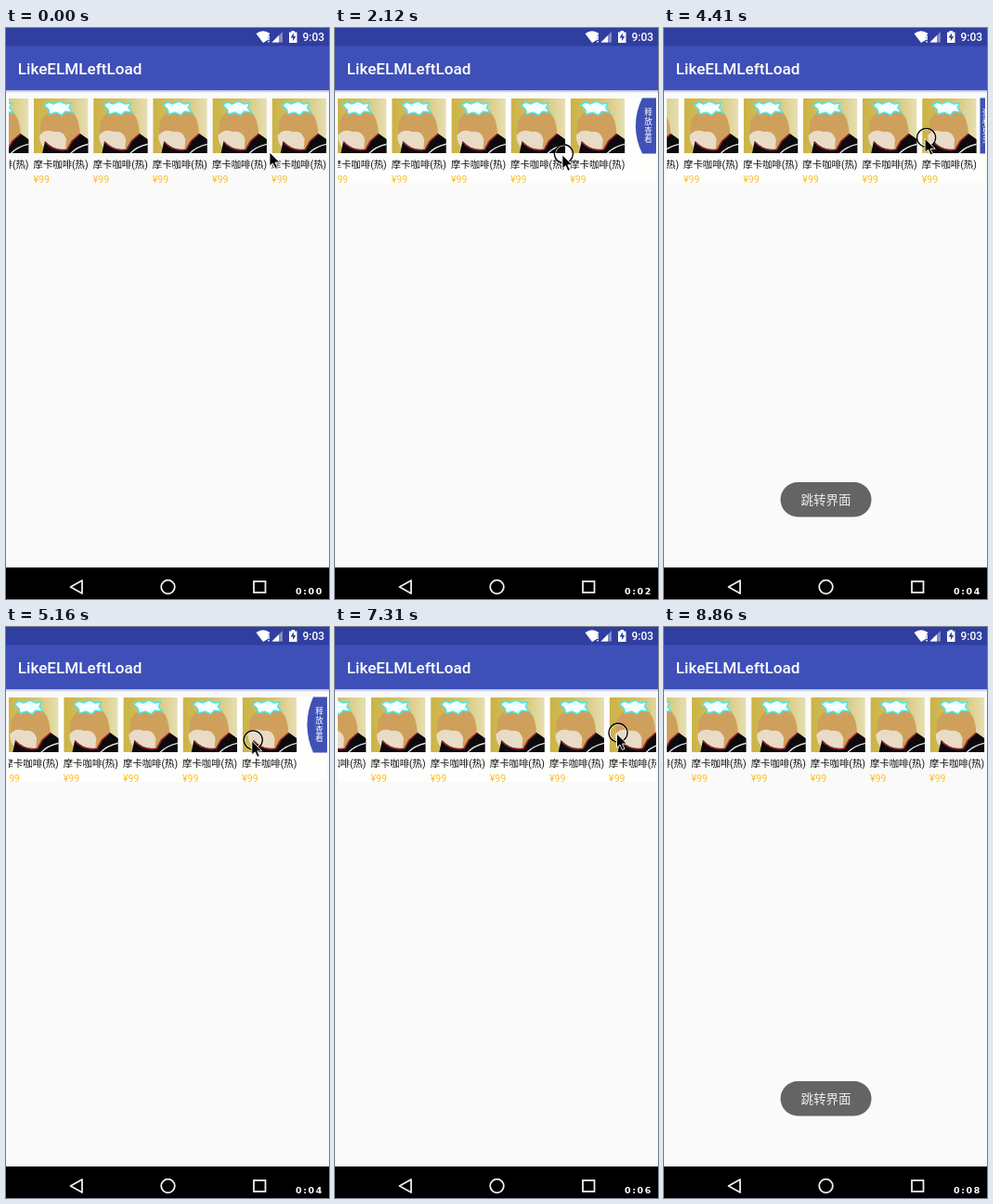
An HTML page that plays this animation: 348 by 616 pixels, repeating every 9.59 s.

```html
<!DOCTYPE html>
<html lang="zh-CN">
<head>
<meta charset="utf-8">
<title>LikeELMLeftLoad</title>
<style>
html, body { margin: 0; width: 100%; height: 100%; overflow: hidden; background: #fafafa; }
svg { display: block; width: 348px; height: 616px; }
text { font-family: Roboto, "Noto Sans CJK SC", "Noto Sans CJK", sans-serif; }
#clock { font: bold 9.5px "DejaVu Sans", sans-serif; letter-spacing: 1.6px; }
</style>
</head>
<body>
<svg viewBox="0 0 348 616">
  <defs>
    <linearGradient id="backdrop">
      <stop offset="0" stop-color="#cbb345"/>
      <stop offset=".55" stop-color="#d5c36c"/>
      <stop offset="1" stop-color="#e6dfb4"/>
    </linearGradient>
    <linearGradient id="shade" x2="0" y2="1">
      <stop offset="0" stop-color="#a9b1dc"/>
      <stop offset="1" stop-color="#fafafa"/>
    </linearGradient>
    <clipPath id="photo"><rect width="58.5" height="59"/></clipPath>
    <clipPath id="listArea"><rect x="3" y="75" width="343" height="92"/></clipPath>
    <g id="card">
      <g transform="translate(0 76)" clip-path="url(#photo)">
        <rect width="58.5" height="59" fill="url(#backdrop)"/>
        <path d="M8 24Q13 12 28 13 44 10 48 26 52 40 46 53H14Q4 42 8 24Z" fill="#cfa05c"/>
        <path d="M6 40Q12 32 22 36 32 34 35 44L34 56H14Q6 50 6 40Z" fill="#e8dcc6"/>
        <path d="M11 7L16 4 21 6 28 3 34 6 40 5 38 10 42 15 34 14 30 18 24 15 17 17 16 12Z" fill="#f4ffff" stroke="#4fe6e6" stroke-width="1.5"/>
        <path d="M9 60L12 46Q22 57 36 55L40 47 50 38 60 45V60Z" fill="#0c0a0c"/>
        <path d="M12 47Q22 58 36 55L41 46 50 38" fill="none" stroke="#96222a" stroke-width="1.6"/>
        <path d="M39 60Q46 52 60 49" fill="none" stroke="#eee" stroke-width="1.3"/>
      </g>
      <text x="-.5" y="151" font-size="10.4" fill="#111">摩卡咖啡(热)</text>
      <text x="-.5" y="166.5" font-size="10.6" fill="#fbc02d">¥99</text>
    </g>
  </defs>

  <rect width="348" height="616" fill="#fafafa"/>
  <rect y="67" width="348" height="3" fill="url(#shade)"/>
  <rect y="19" width="348" height="48" fill="#3e50b7"/>
  <rect width="348" height="19.5" fill="#303ea0"/>
  <text x="12.8" y="50" font-size="17.1" font-weight="500" fill="#fff">LikeELMLeftLoad</text>

  <g fill="#fff">
    <path d="M269.5 6Q277 .5 284.5 6L282 9V13L277 16Z"/>
    <path d="M282.3 8h1.5v5h-1.5zM282.3 14h1.5v1.6h-1.5z"/>
    <path d="M298 4V15.5H286.5Z" opacity=".4"/>
    <path d="M294 8V15.5H286.5Z"/>
    <path d="M305 4.5H307.5V3H311V4.5H313.5V16H305Z"/>
    <text x="319.5" y="14" font-size="12" font-weight="500">9:03</text>
  </g>
  <path d="M310 5.5L306.5 10.5H309V14L312.3 9H310Z" fill="#303ea0"/>

  <g clip-path="url(#listArea)">
    <rect id="band" x="3" y="75" width="343" height="92" fill="#fefefd"/>
    <g id="cards"></g>
    <path id="tail" fill="#3f51b5"/>
    <g id="tailText" font-size="8.6" fill="#fff" text-anchor="middle"></g>
  </g>

  <g id="toast">
    <rect x="125.5" y="490" width="98" height="37.5" rx="18.7" fill="#646464"/>
    <text x="174.5" y="514" font-size="13.5" fill="#eee" text-anchor="middle">跳转界面</text>
  </g>

  <rect y="582" width="348" height="34"/>
  <g fill="none" stroke="#eee" stroke-width="1.8">
    <path d="M69.5 603L82 596V610Z" stroke-linejoin="round"/>
    <circle cx="174.5" cy="603" r="7.3"/>
    <rect x="267" y="597" width="12.5" height="12"/>
  </g>
  <text id="clock" x="312" y="611" fill="#fff"></text>

  <g id="pointer">
    <g id="press" fill="none">
      <circle cx="1.5" r="9" stroke="#fff"/>
      <circle cx="1.5" r="10" stroke="#000" stroke-width="1.3"/>
    </g>
    <path d="M0 1V16L3.5 13 6 18.5 8.5 17.5 6 12H11Z" stroke="#fff" stroke-width=".9"/>
  </g>
</svg>
<script>
const LOOP = 9590, STEP = 150, PHASE = 10;
const PITCH = 64.15, REST = 286.6, RIGHT = 346;
const $ = id => document.getElementById(id);

const ramp = (t, from, to) => Math.min(1, Math.max(0, (t - from) / (to - from)));
const linear = u => u;
const easeOut = u => 1 - (1 - u) ** 2;

// Each gesture adds to the list's pull and the pointer's position.
const gestures = [
  { from: 800, to: 2710, pull: 48, x: -57, y: 4, ease: linear },
  { from: 2710, to: 3270, pull: -48, x: -10, y: 0, ease: easeOut },
  { from: 3270, to: 3710, pull: 0, x: 70, y: -20, ease: linear },
  { from: 4090, to: 5560, pull: 46, x: -32, y: 7, ease: linear },
  { from: 6240, to: 7210, pull: -55, x: 48.5, y: -10, ease: linear },
  { from: 7400, to: 8160, pull: 51, x: -47, y: 4, ease: linear },
  { from: 8160, to: 8760, pull: -42, x: 106, y: 8, ease: easeOut },
];

const travel = (t, axis) => gestures.reduce(
  (sum, g) => sum + g[axis] * g.ease(ramp(t, g.from, g.to)), 0);

const isPressed = t => (t >= 300 && t <= 2710) || (t >= 3710 && t <= 8160);

const toastOpacity = (t, shown) =>
  ramp(t, shown, shown + 200) * (1 - ramp(t, shown + 2050, shown + 2300));

$('cards').innerHTML = Array.from({ length: 7 }, (_, i) =>
  `<use href="#card" x="${(i - 6) * PITCH}"/>`).join('');
$('tailText').innerHTML = Array.from({ length: 4 }, (_, i) =>
  `<text y="${94 + 9.8 * i}"></text>`).join('');
const tailChars = [...$('tailText').children];

function drawTail(pull) {
  const width = Math.min(15, pull * .65);
  const left = RIGHT - width;
  const bulge = 11 * ramp(pull, 20, 40);
  const control = left - 2 * bulge;
  $('tail').setAttribute('d', pull > 0
    ? `M${RIGHT} 75.5H${left}Q${control} 105.5 ${left} 135.5H${RIGHT}Z` : '');
  $('tailText').setAttribute('transform', `translate(${left + 6.5})`);
  $('tailText').style.display = pull > 0 ? '' : 'none';
  const label = pull > 28 ? '释放查看' : '查看更多';
  tailChars.forEach((node, i) => node.textContent = label[i]);
}

function draw(time) {
  const t = Math.max(0, Math.floor((time - PHASE) / STEP) * STEP + PHASE);
  const pull = travel(t, 'pull');
  $('cards').setAttribute('transform', `translate(${REST - pull})`);
  $('band').style.display = Math.abs(pull) > .01 ? '' : 'none';
  drawTail(pull);
  $('toast').style.opacity = Math.max(toastOpacity(t, 2710), toastOpacity(t, 8310));
  $('clock').textContent = '0:0' + Math.floor(t * .00095);
  $('pointer').setAttribute('transform',
    `translate(${284 + travel(t, 'x')} ${133 + travel(t, 'y')})`);
  $('press').style.display = isPressed(t) ? '' : 'none';
}

const start = performance.now();
function frame() {
  draw((performance.now() - start) % LOOP);
  requestAnimationFrame(frame);
}
frame();
</script>
</body>
</html>
```
